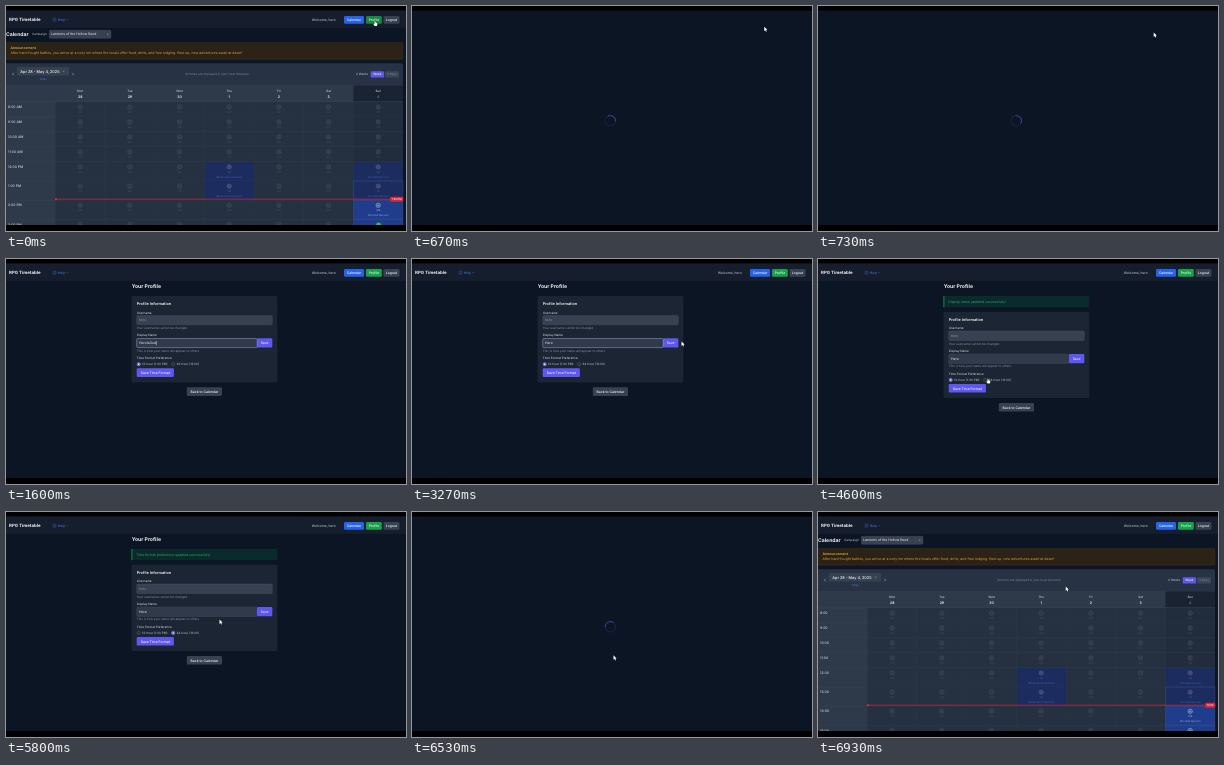
Animation of 400x225 px, one loop 7 s. Source, as an HTML page with a canvas:

```html
<!DOCTYPE html>
<html lang="en">
<head>
<meta charset="utf-8">
<title>Session planner</title>
<style>
  html, body { margin: 0; width: 100%; height: 100%; overflow: hidden; background: #000; }
  canvas { display: block; width: 100vw; height: 100vh; }
</style>
</head>
<body>
<canvas id="stage"></canvas>
<script>
const LOOP = 7000, STEP = 1000 / 15, W = 400, H = 225;
const canvas = document.getElementById('stage');
const ctx = canvas.getContext('2d');
const dpr = window.devicePixelRatio || 1;
canvas.width = W * dpr;
canvas.height = H * dpr;

const NAME = 'Hero';
const SUFFIX = 'IsGod';

// Moments when the state changes, in ms
const AT = {
  loadProfile: 660, profile: 860, focus: 1400, erase: 1660,
  pointerBack: 2930, saved: 3530, radio: 4730, formatSaved: 5195,
  loadCalendar: 6460, calendar: 6660
};

// Pointer path: time, x, y
const PATH = [
  [0, 369, 15], [600, 369, 15], [733, 335.7, 26.5], [1400, 175, 84],
  [2930, 175, 84], [3267, 269.5, 82.5], [3467, 261, 84], [3600, 261, 84],
  [4333, 178, 121], [4600, 170, 119.7], [4733, 167.3, 120.3], [4867, 167.3, 120.3],
  [5067, 152, 129], [5200, 152, 129], [5800, 213.5, 107.5],
  [6200, 199, 147], [6470, 199, 147], [6933, 247.7, 74.5], [7000, 247.7, 74.5]
];

function rect(x, y, w, h, fill, r = 0, stroke) {
  ctx.beginPath();
  ctx.roundRect(x, y, w, h, r);
  if (fill) { ctx.fillStyle = fill; ctx.fill(); }
  if (stroke) { ctx.strokeStyle = stroke; ctx.lineWidth = 0.4; ctx.stroke(); }
}

function circle(x, y, r, fill, stroke, lw = 0.45) {
  ctx.beginPath();
  ctx.arc(x, y, r, 0, Math.PI * 2);
  if (fill) { ctx.fillStyle = fill; ctx.fill(); }
  if (stroke) { ctx.strokeStyle = stroke; ctx.lineWidth = lw; ctx.stroke(); }
}

function line(points, color, lw = 0.5) {
  ctx.beginPath();
  points.forEach(([x, y], i) => i ? ctx.lineTo(x, y) : ctx.moveTo(x, y));
  ctx.strokeStyle = color;
  ctx.lineWidth = lw;
  ctx.stroke();
}

// y is the middle of the capitals
function text(str, x, y, size, color, weight = 400, align = 'left') {
  ctx.font = `${weight} ${size}px Inter, sans-serif`;
  ctx.textAlign = align;
  ctx.fillStyle = color;
  ctx.fillText(str, x, y + size * 0.36);
  return ctx.measureText(str).width;
}

function button(label, x, y, w, h, fill, color = '#f3f4f6', size = 3.4) {
  rect(x, y, w, h, fill, 1.2);
  text(label, x + w / 2, y + h / 2, size, color, 500, 'center');
}

function chevron(x, y, s, color) {
  line([[x - s, y - s / 2], [x, y + s / 2], [x + s, y - s / 2]], color);
}

function backdrop() {
  ctx.fillStyle = '#000';
  ctx.fillRect(0, 0, W, H);
  rect(0, 4.5, W, 214.5, '#0b1523');
}

function header(hover) {
  rect(0, 4.5, W, 17.1, '#161e2d');
  rect(0, 21.4, W, 0.4, '#202a3a');
  text('RPG Timetable', 3, 13.7, 4.4, '#f3f4f6', 700);
  circle(48.5, 13.7, 1.6, null, '#3f69cf');
  text('?', 48.5, 13.7, 2.4, '#3f69cf', 500, 'center');
  text('Help', 51.7, 13.7, 3.4, '#3f69cf', 500);
  chevron(61.3, 13.7, 0.8, '#3f69cf');
  text('Welcome, ' + NAME.toLowerCase(), 305.8, 13.7, 3.4, '#c9ced7');
  button('Calendar', 338, 10, 20, 7.7, '#2563eb');
  button('Profile', 360, 10, 15.8, 7.7, hover ? '#158a40' : '#16a34a');
  button('Logout', 377.5, 10, 16, 7.7, '#374151');
}

function loading(t) {
  const a = t / 160;
  circle(198.3, 114.8, 5.2, null, '#1b2850', 0.9);
  ctx.beginPath();
  ctx.arc(198.3, 114.8, 5.2, a, a + 2.2);
  ctx.strokeStyle = '#4547a8';
  ctx.lineWidth = 0.9;
  ctx.stroke();
}

function radio(x, y, on) {
  if (on) {
    circle(x, y, 1.7, '#5558e8', '#c7c9f7', 0.35);
    circle(x, y, 0.75, '#fff');
  } else {
    circle(x, y, 1.6, '#1f2937', '#667080');
  }
}

function banner(str) {
  rect(125.5, 37, 145.8, 11.2, '#0b2a2c', 1);
  rect(125.5, 37, 0.8, 11.2, '#16a34a');
  text(str, 130.3, 42.6, 3.4, '#2eaa68');
}

function profile(t) {
  const saved = t >= AT.saved;
  const focused = t >= AT.focus && !saved;
  const label = '#c5cad3', dim = '#8a93a2';
  header(false);
  text('Your Profile', 125.7, 27.6, 5.15, '#f3f4f6', 700);
  if (saved) {
    banner(t >= AT.formatSaved
      ? 'Time format preference updated successfully!'
      : 'Display name updated successfully!');
  }

  ctx.save();
  ctx.translate(0, saved ? 15.7 : 0);
  rect(125.5, 37, 145.8, 86.4, '#1c2533', 1.6);
  text('Profile Information', 130.7, 44.6, 3.85, '#f3f4f6', 600);

  text('Username', 130.7, 53.5, 3.05, label, 500);
  rect(130.7, 56.4, 135.6, 9.4, '#374151', 1.2, '#4b5563');
  text(NAME.toLowerCase(), 133, 61.1, 3.4, '#8a93a2');
  text('Your username cannot be changed', 130.7, 68.8, 3.05, dim);

  text('Display Name', 130.7, 76, 3.05, label, 500);
  rect(130.7, 79.5, 120.5, 9.2, '#303a4a', 1.2, '#4b5563');
  rect(251, 79.3, 15.3, 9.3, '#6058ee', 1.2);
  text('Save', 258.6, 84, 3.4, '#e4e4fb', 500, 'center');
  if (focused) rect(130.7, 79.5, 120.5, 9.1, null, 1.2, '#a3a8e6');
  const erased = Math.max(0, Math.min(SUFFIX.length, Math.floor((t - AT.erase) / STEP)));
  const value = NAME + SUFFIX.slice(0, SUFFIX.length - erased);
  const width = text(value, 133, 84, 3.4, '#f3f4f6');
  const caretOn = t < 2000 || Math.floor((t - 2000) / 330) % 2 === 0;
  if (focused && caretOn) rect(133.1 + width, 81.9, 0.4, 4.3, '#f3f4f6');
  text('This is how your name will appear to others', 130.7, 91.5, 3.05, dim);

  text('Time Format Preference', 130.7, 99.4, 3.05, label, 500);
  const long = t >= AT.radio;
  radio(132.7, 105.2, !long);
  text('12-hour (1:00 PM)', 136, 105.2, 3.05, label);
  radio(167.2, 105.2, long);
  text('24-hour (13:00)', 170.4, 105.2, 3.05, label);
  button('Save Time Format', 130.7, 109.3, 37.2, 8.6, '#6058ee');
  button('Back to Calendar', 180.8, 128.3, 35.2, 8.6, '#374151');
  ctx.restore();
}

const DAYS = ['Mon', 'Tue', 'Wed', 'Thu', 'Fri', 'Sat', 'Sun'];
const DATES = [28, 29, 30, 1, 2, 3, 4];
const colX = i => 49.4 + 49.67 * i;
const rowY = r => r < 5 ? 95.9 + 14.95 * r : 155.7 + 19.2 * (r - 4);

function hourLabel(h, long) {
  if (long) return h + ':00';
  return `${(h + 11) % 12 + 1}:00 ${h < 12 ? 'AM' : 'PM'}`;
}

function cell(day, r, long) {
  const x = colX(day), y = rowY(r), h = rowY(r + 1) - y;
  const cx = x + 24.8, cy = y + 5.2;
  const sun = day === 6;
  const future = sun && r >= 6;
  const hot = future || (r > 3 && (sun || (day === 3 && r < 6)));
  const fill = future ? '#203c8c' : hot ? '#1c2c5f' : sun ? '#212d3c' : '#253140';
  const edge = future || (sun && r === 5) ? '#3a559f' : null;
  rect(x + 0.2, y + 0.2, 49.3, h - 0.4, fill, 0, edge);
  if (r === 7 && sun && !long) {
    circle(cx + 0.3, cy + 0.4, 2.4, '#22c55e');
    return;
  }
  const ink = future ? '#b5c4f0' : hot ? '#56648f' : '#4a5666';
  circle(cx, cy, 2.2, future ? '#4a5a88' : hot ? '#3c4870' : '#2c3847', ink);
  rect(cx - 0.9, cy - 0.2, 1.8, 0.4, ink);
  text(future ? '2/4' : hot ? '1/4' : '0/0', cx, cy + 5, 2.5, ink, 400, 'center');
  if (hot) {
    const note = sun ? 'Possible Session' : 'Reserved for Session';
    text(note, cx, cy + 9.7, 2.6, future ? '#8fa8e8' : '#4560b0', 400, 'center');
  }
}

function calendar(long, hover) {
  header(hover);
  text('Calendar', 0, 28.2, 5.1, '#f3f4f6', 700);
  text('Campaign:', 26, 28.2, 3.05, '#c5cad3');
  rect(43.3, 24.2, 61.7, 8.1, '#374151', 1.2, '#4b5563');
  text('Lanterns of the Hollow Reed', 45, 28.2, 3.4, '#f3f4f6');
  chevron(102, 28.2, 0.9, '#c5cad3');

  rect(-1, 36.6, 398, 16.6, '#2b2218', 1.2, '#4a3714');
  text('Announcement', 4.4, 41.8, 3.45, '#e9ab2b', 600);
  text('After hard-fought battles, you arrive at a cozy inn where the locals offer food, drink, ' +
    'and free lodging. Rest up, new adventures await at dawn!', 4.4, 47.2, 3.47, '#d9a12f');

  ctx.save();
  ctx.beginPath();
  ctx.rect(0, 4.5, W, 214.5);
  ctx.clip();
  rect(-2, 57.2, 399, 170, '#273344', 1.6);
  rect(0, 79.2, 397, 140, '#2e3a4a');
  line([[7.7, 66.8], [6.5, 68.1], [7.7, 69.4]], '#c5cad3');
  line([[66.4, 66.8], [67.6, 68.1], [66.4, 69.4]], '#c5cad3');
  rect(11, 61, 52, 8.6, '#364252', 1.2);
  text('Apr 28 - May 4, 2025', 14.3, 65.2, 3.85, '#f3f4f6', 500);
  chevron(57.5, 65.2, 1, '#aab2be');
  text('Today', 37, 73.4, 2.6, '#4f7ee8', 400, 'center');
  text('All times are displayed in your local timezone', 211, 68.4, 3, '#7d8898', 400, 'center');
  text('2 Weeks', 350, 68.4, 3, '#c5cad3');
  button('Week', 364.7, 65.2, 13.3, 6.4, '#6058ee', '#f3f4f6', 3);
  button('3 Days', 378.8, 65.2, 14.2, 6.4, '#3b4656', '#77818f', 3);

  rect(0, 79.2, 397, 0.4, '#354152');
  rect(colX(6), 79.4, 49.6, 16.4, '#1a2332');
  DAYS.forEach((d, i) => {
    const cx = colX(i) + 24.8;
    text(d, cx, 84.7, 3.05, '#c0c6d0', 500, 'center');
    text(String(DATES[i]), cx, 90.3, 3.5, i === 6 ? '#6172a0' : '#f3f4f6', 600, 'center');
  });
  rect(0, 95.5, 397, 0.4, '#354152');
  for (let r = 0; r < 8; r++) {
    const y = rowY(r);
    rect(0, y, 49.4, 0.3, '#364353');
    text(hourLabel(8 + r, long), 2, y + 5, 3.4, '#d0d5dd', 500);
    DAYS.forEach((d, i) => cell(i, r, long));
  }

  rect(49.4, 192.8, 347.6, 0.8, '#cf2438');
  circle(50, 193.2, 1, '#ef2b3c');
  const px = long ? 387 : 384;
  rect(px, 190.7, 397.3 - px, 5, '#dc2636', 1.4);
  text(long ? '13:55' : '1:55 PM', (px + 397.3) / 2, 193.2, 2.6, '#fff', 500, 'center');
  ctx.restore();
}

function pointerAt(t) {
  const i = Math.max(1, PATH.findIndex(p => p[0] >= t));
  const [t0, x0, y0] = PATH[i - 1], [t1, x1, y1] = PATH[i];
  const u = (t - t0) / (t1 - t0), e = u * u * (3 - 2 * u);
  return [x0 + (x1 - x0) * e, y0 + (y1 - y0) * e];
}

function shape(points) {
  ctx.beginPath();
  points.forEach(([x, y]) => ctx.lineTo(x, y));
  ctx.closePath();
  ctx.strokeStyle = '#10151d';
  ctx.lineWidth = 0.7;
  ctx.lineJoin = 'round';
  ctx.stroke();
  ctx.fillStyle = '#fff';
  ctx.fill();
}

function pointer(t) {
  if (t > 1490 && t < AT.pointerBack) return;
  const [x, y] = pointerAt(t);
  const hand = t < 640 || (t > 3400 && t < 3640) || (t > 4440 && t < 5260) || (t > 6100 && t < 6460);
  ctx.save();
  ctx.translate(x, y);
  if (hand) {
    shape([[-0.5, 0], [0.4, 0], [0.5, 1.6], [2.2, 2], [2.4, 3.4], [1.8, 4.9], [-0.5, 4.9], [-1.7, 3], [-1.4, 2.5], [-0.5, 3]]);
  } else {
    shape([[0, 0], [0, 4.4], [1, 3.5], [1.7, 5.1], [2.5, 4.8], [1.8, 3.2], [3.1, 3.1]]);
  }
  ctx.restore();
}

function draw(now) {
  const t = Math.floor((now % LOOP + 5) / STEP) % 105 * STEP;
  ctx.setTransform(dpr, 0, 0, dpr, 0, 0);
  ctx.textRendering = 'geometricPrecision';
  backdrop();
  if (t < AT.loadProfile) calendar(false, true);
  else if (t < AT.profile) loading(t);
  else if (t < AT.loadCalendar) profile(t);
  else if (t < AT.calendar) loading(t);
  else calendar(true, false);
  pointer(t);
}

let start = null;
function tick() {
  const now = performance.now();
  if (start === null) start = now;
  draw(now - start);
  requestAnimationFrame(tick);
}
tick();
</script>
</body>
</html>
```
